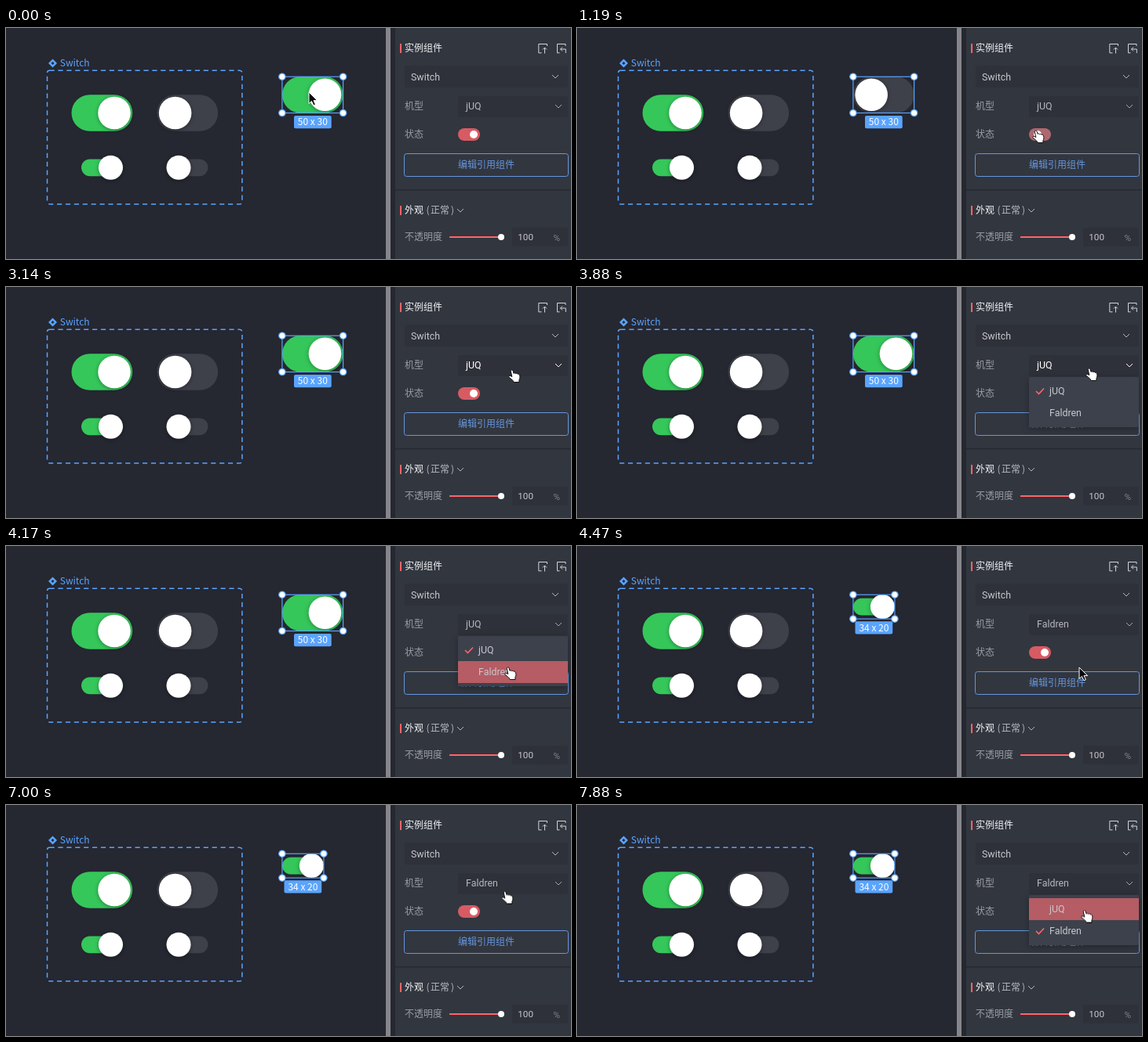
An HTML page that plays this animation: 720 px wide and 295 px high, repeating every 8 s.

```html
<!DOCTYPE html>
<html lang="zh">
<head>
<meta charset="utf-8">
<title>Switch component</title>
<style>
html, body { margin: 0; width: 100%; height: 100%; overflow: hidden; background: #252731; }
svg { display: block; width: 720px; height: 295px; }
text { font: 12px "Noto Sans CJK SC", "Noto Sans CJK", sans-serif; }
.ui { font: 12.4px Roboto, sans-serif; fill: #c6c8cd; }
.small { font-size: 11.7px; }
.title { font-weight: 500; fill: #f1f2f4; }
.label { fill: #9a9da5; }
.note { fill: #b9bcc2; }
.name { font-weight: 500; }
.tag { font-weight: 500; fill: #fff; text-anchor: middle; }
.line { fill: none; stroke: #b4b7bd; }
.icon { fill: none; stroke: #d3d5da; }
.blue { fill: none; stroke: #5aa4ff; stroke-width: 1.2; }
.box { fill: #2e3139; }
.knob { fill: #fff; filter: drop-shadow(0 1px 2.5px rgba(0, 0, 0, .35)); }
.menu { fill: #3d414b; filter: drop-shadow(0 2px 4px rgba(0, 0, 0, .3)); }
.row { fill: #b55c64; }
.check { fill: none; stroke: #ff6469; stroke-width: 1.6; }

/* Every part holds its pose until the next step of the shared 8 s clock. */
.step { animation: 8s step-end infinite; }
.hidden { opacity: 0; }
#cursor { transform: translate(386px, 82px); animation-name: cursor; }
#arrow { animation-name: arrow; }
#hand { animation-name: hand; }
.on { animation-name: on; }
.off { animation-name: off; }
.first { animation-name: first; }
.second { animation-name: second; }
#toggle { fill: #d75b63; animation-name: toggle; }
#dot { transform: translate(596px, 136px); animation-name: dot; }
#menu { animation-name: menu; }
#hover { fill: #b4b7bd; stroke: #a4a7ae; animation-name: hover; }
#hover text { fill: inherit; stroke: none; }
#hover path { fill: none; stroke: inherit; }
#row1 { animation-name: row1; }
#row2 { animation-name: row2; }

@keyframes cursor {
  3.75% { transform: translate(418px, 91px); }
  5.625% { transform: translate(506px, 112px); }
  7.375% { transform: translate(574px, 128px); }
  9.25% { transform: translate(580px, 130px); }
  35.5% { transform: translate(588px, 126px); }
  37.375% { transform: translate(615px, 115px); }
  39.125% { transform: translate(640px, 105px); }
  41% { transform: translate(647px, 101px); }
  48.5% { transform: translate(648px, 103px); }
  50.25% { transform: translate(644px, 128px); }
  52.125% { transform: translate(635px, 154px); }
  55.875% { transform: translate(640px, 155px); }
  61.375% { transform: translate(628px, 151px); }
  63.25% { transform: translate(599px, 140px); }
  65.125% { transform: translate(591.5px, 137px); }
  87.5% { transform: translate(631px, 109.5px); }
  89.25% { transform: translate(641px, 101px); }
  91.125% { transform: translate(642px, 100px); }
  94.875% { transform: translate(642px, 111px); }
  96.75% { transform: translate(642px, 127px); }
  98.5% { transform: translate(642px, 133.5px); }
}
@keyframes arrow {
  7.375% { opacity: 0; }
  55.875% { opacity: 1; }
  63.25% { opacity: 0; }
}
@keyframes hand {
  7.375% { opacity: 1; }
  55.875% { opacity: 0; }
  63.25% { opacity: 1; }
}
@keyframes on {
  14.875%, 70.75% { opacity: 0; }
  29.875%, 81.875% { opacity: 1; }
}
@keyframes off {
  14.875%, 70.75% { opacity: 1; }
  29.875%, 81.875% { opacity: 0; }
}
@keyframes first { 55.875% { opacity: 0; } }
@keyframes second { 55.875% { opacity: 1; } }
@keyframes toggle {
  9.25%, 29.875%, 65.125%, 81.875% { fill: #ff5c62; }
  14.875%, 70.75% { fill: #b0686f; }
  16.75%, 72.625% { fill: #75747c; }
  35.5%, 87.5% { fill: #d75b63; }
}
@keyframes dot {
  14.875%, 70.75% { transform: translate(587px, 136px); }
  16.75%, 72.625% { transform: translate(584px, 136px); }
  29.875%, 81.875% { transform: translate(593px, 136px); }
  31.75%, 83.75% { transform: translate(596px, 136px); }
}
@keyframes menu {
  41% { opacity: .5; }
  42.875%, 91.125% { opacity: 1; }
  55.875% { opacity: 0; }
}
@keyframes hover {
  39.125%, 89.25% { fill: #fff; stroke: #fff; }
  50.25%, 94.875% { fill: #b4b7bd; stroke: #a4a7ae; }
}
@keyframes row1 {
  50.25%, 98.5% { opacity: 1; }
  52.125% { opacity: 0; }
  96.75% { opacity: .6; }
}
@keyframes row2 {
  52.125% { opacity: 1; }
  55.875% { opacity: 0; }
}
</style>
</head>
<body>
<svg viewBox="0 0 720 295">
  <defs>
    <g id="bigOn">
      <rect width="77.7" height="46.6" rx="23.3" fill="#35c75a"/>
      <circle class="knob" cx="54.5" cy="23.3" r="20.8"/>
    </g>
    <g id="bigOff">
      <rect width="77.7" height="46.6" rx="23.3" fill="#3e404a"/>
      <circle class="knob" cx="23.2" cy="23.3" r="20.8"/>
    </g>
    <g id="smallOn">
      <rect y="4.7" width="53" height="21.8" rx="10.9" fill="#35c75a"/>
      <circle class="knob" cx="37.4" cy="15.6" r="15.5"/>
    </g>
    <g id="smallOff">
      <rect y="4.7" width="53" height="21.8" rx="10.9" fill="#3e404a"/>
      <circle class="knob" cx="15.6" cy="15.6" r="15.5"/>
    </g>
    <circle id="grip" r="4.2" fill="#fff" stroke="#5aa4ff" stroke-width="1.2"/>
    <path id="chevron" d="M-4-2L0 2L4-2"/>
    <path id="tick" d="M-5 0L-1.5 3.5L5-3.5"/>
  </defs>

  <rect width="720" height="295" fill="#252731"/>

  <!-- Component set -->
  <g fill="#5aa4ff">
    <path d="M59.5 39.5L65 45L59.5 50.5L54 45Z"/>
    <path d="M59.5 43L61.5 45L59.5 47L57.5 45Z" fill="#252731"/>
    <text class="name" x="68.8" y="49.3">Switch</text>
  </g>
  <rect class="blue" x="52.5" y="54.2" width="248.4" height="170.8" rx="3" stroke-dasharray="6.2 4.7" style="stroke-width:1.5"/>
  <use href="#bigOn" x="83.5" y="85.2"/>
  <use href="#bigOff" x="192.4" y="85.2"/>
  <use href="#smallOn" x="96" y="162.7"/>
  <use href="#smallOff" x="204.4" y="162.7"/>

  <!-- Selected instance -->
  <g class="step first">
    <use class="step on" href="#bigOn" x="351.9" y="62"/>
    <use class="step off hidden" href="#bigOff" x="351.9" y="62"/>
    <rect class="blue" x="351.9" y="62.2" width="77.7" height="46.3"/>
    <use href="#grip" x="351.9" y="62.2"/>
    <use href="#grip" x="429.6" y="62.2"/>
    <use href="#grip" x="351.9" y="108.5"/>
    <use href="#grip" x="429.6" y="108.5"/>
    <rect x="367" y="112" width="47.7" height="16.2" rx="2" fill="#5aa4ff"/>
    <text class="tag" x="390.8" y="124.4">50 x 30</text>
  </g>
  <g class="step second hidden">
    <use class="step on" href="#smallOn" x="351.9" y="62"/>
    <use class="step off hidden" href="#smallOff" x="351.9" y="62"/>
    <rect class="blue" x="351.9" y="62.2" width="53" height="30.9"/>
    <use href="#grip" x="351.9" y="62.2"/>
    <use href="#grip" x="404.9" y="62.2"/>
    <use href="#grip" x="351.9" y="93.1"/>
    <use href="#grip" x="404.9" y="93.1"/>
    <rect x="354.5" y="96.3" width="47.7" height="16.2" rx="2" fill="#5aa4ff"/>
    <text class="tag" x="378.4" y="108.6">34 x 20</text>
  </g>

  <!-- Panel -->
  <rect x="484" width="6" height="295" fill="#85858b"/>
  <rect x="490" width="6" height="295" fill="#252731"/>
  <rect x="496" width="224" height="295" fill="#32363f"/>
  <rect x="496" y="206" width="224" height="1.5" fill="#282a32"/>
  <path d="M502 20h2v12h-2zM502 227h2v12h-2z" fill="#ff6469"/>
  <text class="title" x="508" y="30.4">实例组件</text>
  <g class="icon">
    <path d="M689.5 23V20.5H678.8V31.8H682.5M686.5 32.5V25M684 27.5L686.5 25L689 27.5"/>
    <path d="M713 23V20.5H702.5V31.8H705.5M713.3 32V27H706.5M709 24.5L706.5 27L709 29.5"/>
  </g>
  <rect class="box" x="508" y="48" width="208" height="28" rx="2"/>
  <text class="ui" x="516" y="66.6">Switch</text>
  <use class="line" href="#chevron" x="700" y="62"/>

  <text class="label" x="508" y="104.4">机型</text>
  <rect class="box" x="576" y="87" width="140" height="27" rx="2"/>
  <g id="hover" class="step">
    <text class="ui step first" x="586" y="104.4">jUQ</text>
    <text class="ui step second hidden" x="586" y="104.4">Faldren</text>
    <path d="M700 98L704 102L708 98"/>
  </g>

  <text class="label" x="508" y="140.4">状态</text>
  <rect id="toggle" class="step" x="576" y="128" width="28" height="16" rx="8"/>
  <circle id="dot" class="step" r="5" fill="#fff"/>

  <rect x="507.5" y="160.5" width="209" height="29" rx="3" fill="none" stroke="#6596dc"/>
  <text x="576" y="179.4" fill="#6596dc">编辑引用组件</text>

  <text class="title" x="508" y="237.4">外观</text>
  <text class="note" x="535.5" y="237.4">(</text>
  <text class="note" x="541" y="237.4">正常</text>
  <text class="note" x="567" y="237.4">)</text>
  <use class="line" href="#chevron" x="579" y="233"/>

  <text class="label" x="508" y="271.4">不透明度</text>
  <path d="M565 267H628" stroke="#ff6469" stroke-width="2"/>
  <circle cx="631" cy="267" r="4" fill="#fff"/>
  <rect class="box" x="645" y="255" width="71" height="24" rx="2"/>
  <text class="ui small" x="652.3" y="271.3">100</text>
  <text class="ui small" x="697.5" y="271.5" style="fill:#7d8088">%</text>

  <!-- Drop-down -->
  <g id="menu" class="step hidden">
    <rect class="menu" x="576" y="115" width="140" height="64" rx="2"/>
    <rect id="row1" class="row step hidden" x="576" y="119" width="140" height="28"/>
    <rect id="row2" class="row step hidden" x="576" y="147" width="140" height="28"/>
    <use class="check step first" href="#tick" x="590" y="133"/>
    <use class="check step second hidden" href="#tick" x="590" y="161"/>
    <text class="ui" x="602" y="137.4">jUQ</text>
    <text class="ui" x="602" y="165.4">Faldren</text>
  </g>

  <g id="cursor" class="step">
    <path id="arrow" class="step" d="M0 0V14.5L3.4 11.4L6 16.8L8.4 15.7L6 10.6H10.6Z" fill="#08080a" stroke="#fff"/>
    <path id="hand" class="step hidden" fill="#fff" stroke="#111" stroke-linejoin="round"
      d="M3.3 2.6C3 1 5.4 .2 6 1.9L7 5.4C7.6 4.6 9.2 4.7 9.6 5.7C10.4 5 11.8 5.2 12.1 6.3C13.2 5.8 14.4 6.5 14.6 7.8C15.1 10.2 15.1 11.6 13.9 13.6L14 16.5H7.2C6.4 14 3.6 12.4 1 10.2C0 8.9 1.8 7.7 3 8.6L4.8 9.6Z"/>
  </g>
</svg>
</body>
</html>
```
